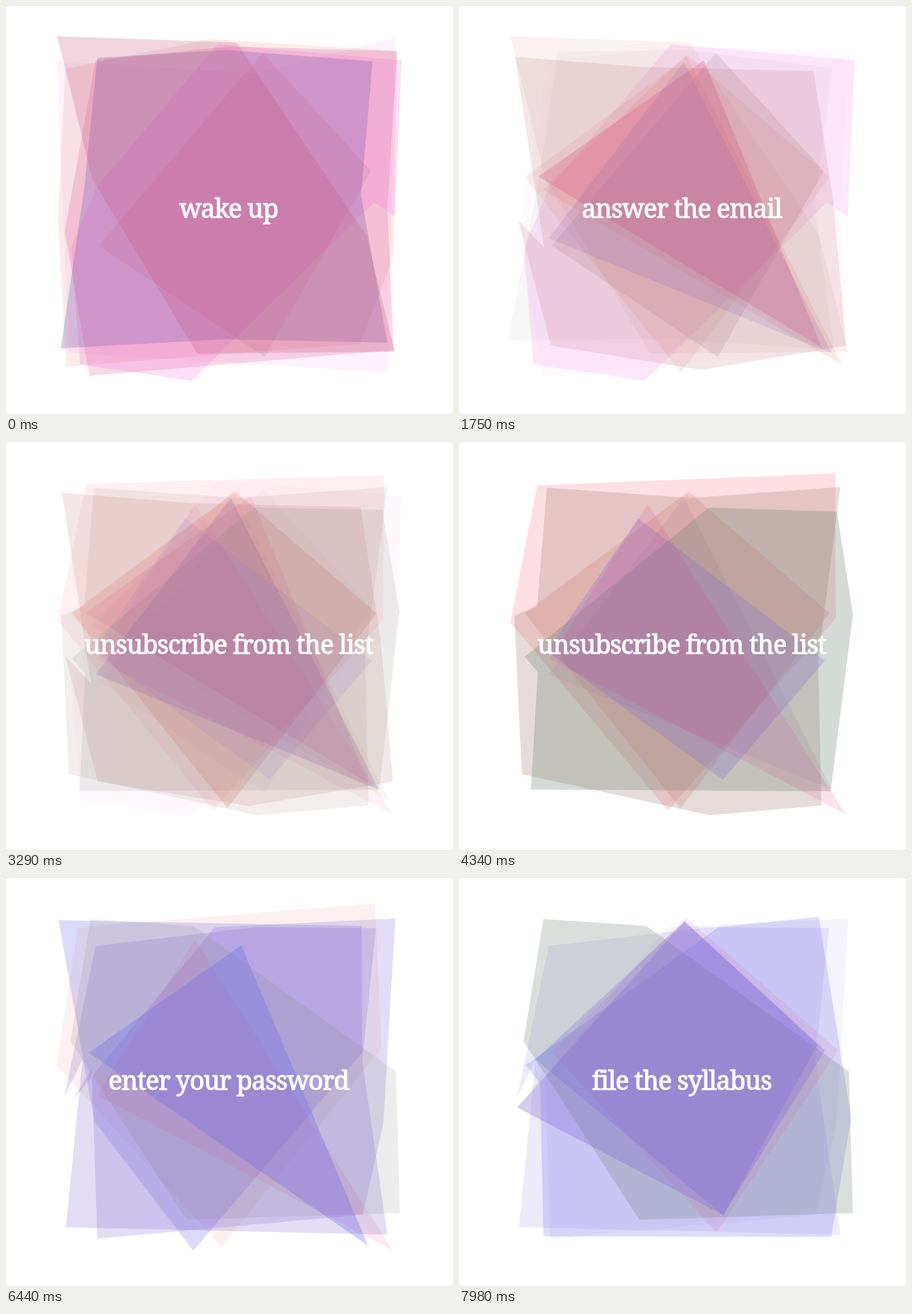
These frames come from a looping animation (783 by 715 pixels, 8.05 s). An HTML page with a canvas:

```html
<!DOCTYPE html>
<html lang="en">
<head>
<meta charset="utf-8">
<title>Daily tasks</title>
<style>
html, body { margin: 0; width: 100%; height: 100%; overflow: hidden; background: #fff; }
canvas { display: block; }
</style>
</head>
<body>
<canvas id="stage" width="783" height="715"></canvas>
<script>
const W = 783, H = 715, LOOP = 8050, STEP = 70, TEXT_START = 910, TEXT_HOLD = 1150;
const ctx = document.getElementById('stage').getContext('2d');
const keys = [0, 980, 2380, 4340, 5320, 6440, 7980];
const tasks = ['wake up', 'answer the email', 'drop off the child', 'unsubscribe from the list',
  'click confirm on Moodle', 'enter your password', 'file the syllabus'];
const palette = {
  rose: '#c35a7d', pink: '#f05fdc', plum: '#7f5bb1', clay: '#af5f5c', coral: '#d7695a',
  magenta: '#d7417d', scarlet: '#f55f78', umber: '#967369', grey: '#7a7d7a',
  sage: '#708573', violet: '#826cd0', blue: '#6464e6'
};
const sheets = [];

// A translucent sheet: `tints` names a colour and its strength at each key from `first` on.
// It fades in before and out after them, turning by `spin` radians per key.
function sheet(first, tints, outline, spin = 0) {
  sheets.push({
    first, spin,
    tints: tints.split(', ').map(s => s.split(' ')),
    points: outline.split(' ').map(p => p.split(',').map(Number))
  });
}

// Morning
sheet(0, 'pink .08', '89,97 440,118 682,55 669,642 110,608');
sheet(0, 'coral .13', '104,110 357,58 685,79 679,438 620,592 105,632 91,366');
sheet(0, 'magenta .2, pink .06', '157,95 390,71 685,79 668,350 679,603 146,648 103,394');
sheet(0, 'pink .2, pink .24, pink .07',
  '371,67 693,95 681,369 645,344 325,657 130,628 114,424 158,318');
sheet(0, 'plum .3, grey .14', '160,91 385,77 642,97 622,332 668,590 385,584 96,600 137,320', .03);
sheet(0, 'rose .25, clay .18', '90,53 404,64 631,402 681,606 335,609 151,303');

// Family
sheet(2, 'clay .27', '98,89 322,107 621,114 656,345 678,595 425,638 161,595 104,376 149,423');
sheet(2, 'coral .2, coral .22', '402,87 649,300 388,642 115,300');
sheet(1, 'magenta .25, magenta .25', '429,95 635,598 139,299');
sheet(0, 'rose .15, rose .3, grey .07', '450,82 639,289 453,615 162,420');
sheet(1, 'coral .15, coral .12', '398,86 671,629 147,322');
sheet(2, 'plum .3, plum .12', '394,98 653,609 157,407');

// Inbox
sheet(3, 'scarlet .2, scarlet .22, coral .09', '137,76 659,55 660,309 366,646 90,316', -.02);
sheet(3, 'umber .25, sage .18', '154,80 405,98 668,79 629,382 635,637 438,654 110,582 97,304 137,288');
sheet(3, 'sage .3, grey .15', '438,115 662,122 690,302 651,612 126,609 138,403 115,376', .02);
sheet(3, 'violet .28, magenta .1', '314,134 641,383 462,592 154,367');

// Login and paperwork
sheet(4, 'blue .13, blue .23', '92,74 623,84 624,306 328,653 155,427');
sheet(5, 'violet .23, violet .08', '366,86 682,71 661,430 625,590 160,632 150,335 116,390');
sheet(5, 'violet .23, violet .14', '157,119 440,86 648,88 624,320 668,625 105,612 134,318 102,384');
sheet(6, 'blue .22', '455,86 630,68 687,420 652,629 148,628 142,360 117,328');
sheet(5, 'grey .15, sage .26', '148,72 328,84 683,339 690,587 316,599 135,320 113,286');
sheet(3, 'magenta .15, magenta .22, magenta .1', '331,109 677,652 159,380');
sheet(4, 'blue .3, blue .3', '412,118 634,644 145,306');
sheet(6, 'magenta .1', '398,69 664,302 451,621 163,305');
sheet(6, 'blue .25', '395,76 628,292 463,591 134,318');
sheet(6, 'violet .33', '395,76 641,302 463,591 102,402');

function tintAt({ first, tints }, key) {
  const i = key - first;
  const [name, strength] = tints[Math.max(0, Math.min(i, tints.length - 1))];
  const rgb = palette[name].match(/\w\w/g).map(h => parseInt(h, 16));
  return [...rgb, tints[i] ? +strength : 0];
}

function drawSheet(s, time) {
  const key = Math.floor(time), u = time - key;
  const to = tintAt(s, key + 1);
  const tint = tintAt(s, key).map((v, i) => v + (to[i] - v) * u);
  if (!tint[3]) return;
  ctx.save();
  ctx.translate(W / 2, H / 2);
  ctx.rotate(s.spin * (time - s.first));
  ctx.translate(-W / 2, -H / 2);
  ctx.beginPath();
  for (const [x, y] of s.points) ctx.lineTo(x, y);
  ctx.fillStyle = `rgba(${tint})`;
  ctx.fill();
  ctx.restore();
}

function drawText(t) {
  const i = Math.max(0, 1 + Math.floor((t - TEXT_START) / TEXT_HOLD));
  const text = tasks[Math.min(i, tasks.length - 1)];
  ctx.font = '500 45px "Roboto Slab", "Noto Serif", serif';
  ctx.letterSpacing = '-1.3px';
  ctx.textAlign = 'center';
  ctx.fillStyle = ctx.strokeStyle = '#fff';
  ctx.lineWidth = 1.3;
  ctx.lineJoin = 'round';
  ctx.fillText(text, 390, 371);
  ctx.strokeText(text, 390, 371);
}

function draw(now) {
  const t = Math.floor((now % LOOP) / STEP) * STEP;
  const key = keys.findLastIndex(k => t >= k);
  const next = keys[key + 1] ?? LOOP;
  const time = key + (t - keys[key]) / (next - keys[key]);
  ctx.fillStyle = '#fff';
  ctx.fillRect(0, 0, W, H);
  for (const s of sheets) drawSheet(s, time);
  drawText(t);
  ctx.fillStyle = '#888';
  for (const x of [0, W - 1]) for (const y of [0, H - 1]) ctx.fillRect(x, y, 1, 1);
}

let start;
function tick(now) {
  start ??= now;
  draw(now - start);
  requestAnimationFrame(tick);
}
draw(0);
requestAnimationFrame(tick);
</script>
</body>
</html>
```
